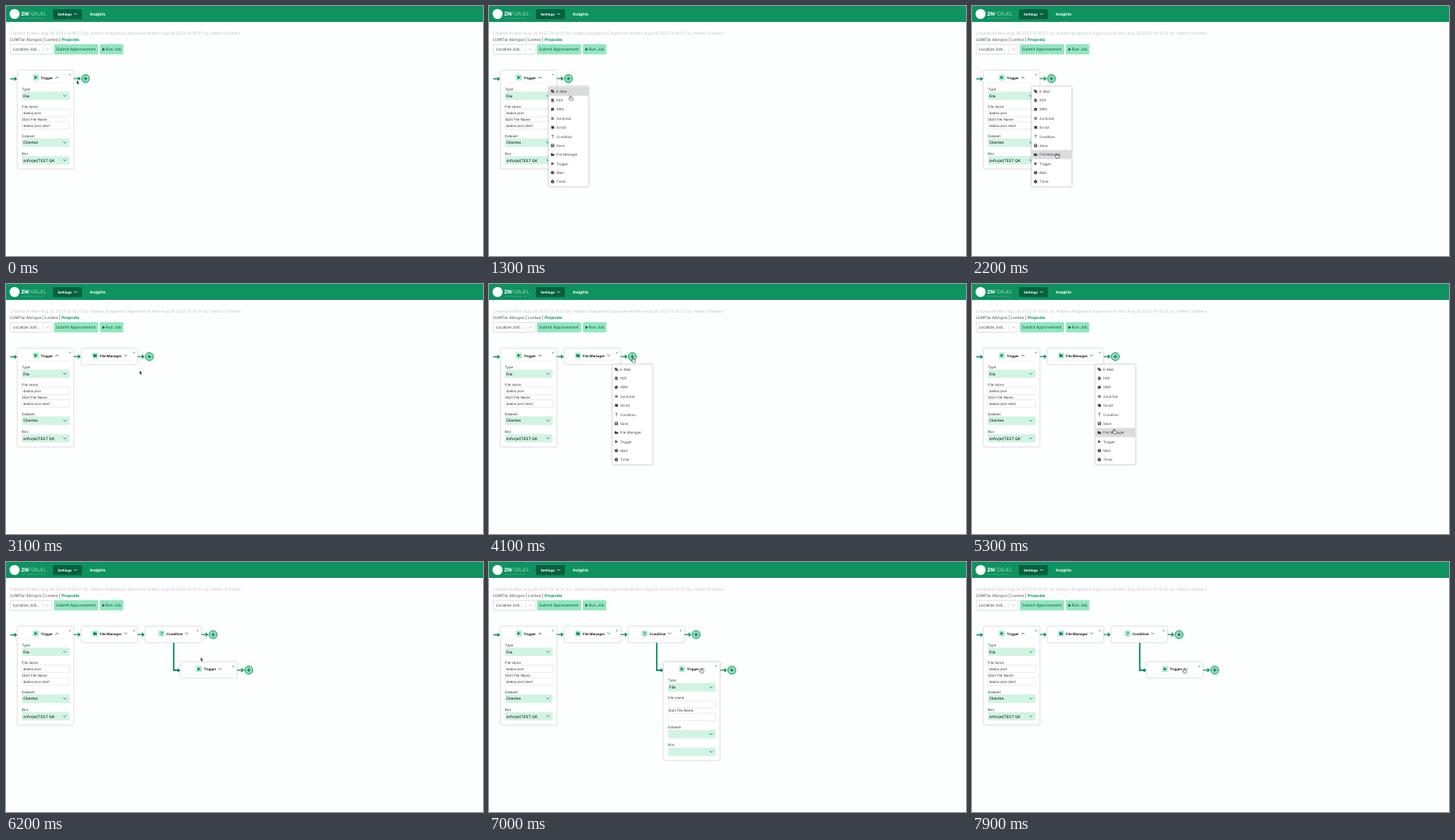
An HTML page that plays this animation: 600 px wide and 314 px high, repeating every 8000 ms.

```html
<!DOCTYPE html>
<html lang="en">
<head>
<meta charset="utf-8">
<title>Flow builder</title>
<style>
html, body { margin: 0; width: 100%; height: 100%; overflow: hidden; background: #fdfefe; }
svg { display: block; width: 600px; height: 314px; }
text { font-family: Inter, sans-serif; font-size: 4.4px; fill: #333; text-rendering: geometricPrecision; white-space: pre; }
.m { font-size: 5.04px; }
.s { font-size: 4.8px; font-weight: 500; fill: #222; }
.b { font-weight: 700; }
.card { fill: #fff; stroke: #dcdfde; stroke-width: .6; filter: drop-shadow(0 .6px .8px #0002); }
.field { fill: #fff; stroke: #d6d6d6; stroke-width: .5; }
.select { fill: #d2f4e3; }
.line { fill: none; stroke: #0d8f60; stroke-width: 1.3; }
.chev { fill: none; stroke-width: .8; stroke-linecap: round; stroke-linejoin: round; }

.anim, #cursor, .hover { animation: 8s step-end infinite; }
#add1 { animation-name: add1; }
#file { animation-name: file; }
#add2 { animation-name: add2; }
#cond { animation-name: cond; }
#menu1 { animation-name: menu1; }
#menu2 { animation-name: menu2; }
#open { animation-name: open; }
#arrow { animation-name: arrow; }
#hand { animation-name: hand; }
#menu1 .hover { animation-name: hover1; }
#menu2 .hover { animation-name: hover2; }
#cursor { animation-name: move; animation-timing-function: linear; }

@keyframes add1 { 0% { opacity: 1 } 29.375%, 100% { opacity: 0 } }
@keyframes file { 0% { opacity: 0 } 29.375%, 100% { opacity: 1 } }
@keyframes add2 { 0% { opacity: 0 } 29.375% { opacity: 1 } 71%, 100% { opacity: 0 } }
@keyframes cond { 0% { opacity: 0 } 71%, 100% { opacity: 1 } }
@keyframes menu1 { 0% { opacity: 0 } 10.625% { opacity: 1 } 29.375%, 100% { opacity: 0 } }
@keyframes menu2 { 0% { opacity: 0 } 47.5% { opacity: 1 } 71%, 100% { opacity: 0 } }
@keyframes open { 0% { opacity: 0 } 84.375% { opacity: 1 } 98.125%, 100% { opacity: 0 } }
@keyframes arrow {
  0% { opacity: 1 } 2.5% { opacity: 0 } 29.375% { opacity: 1 } 40% { opacity: 0 }
  71% { opacity: 1 } 81.5%, 100% { opacity: 0 }
}
@keyframes hand {
  0% { opacity: 0 } 2.5% { opacity: 1 } 29.375% { opacity: 0 } 40% { opacity: 1 }
  71% { opacity: 0 } 81.5%, 100% { opacity: 1 }
}
@keyframes move {
  0%, 1% { transform: translate(89px, 93.2px) }
  5%, 12.5% { transform: translate(100px, 91.5px) }
  15%, 16.25% { transform: translate(102.6px, 112.3px) }
  26.25%, 30.5% { transform: translate(106.5px, 185px) }
  40.5%, 53.75% { transform: translate(181px, 92.5px) }
  61.25%, 62.5% { transform: translate(180px, 208px) }
  65%, 66.9% { transform: translate(178.6px, 182px) }
  69.4%, 71.5% { transform: translate(179px, 163.5px) }
  77%, 78% { transform: translate(244.8px, 119.6px) }
  82.5%, 100% { transform: translate(266.9px, 133.3px) }
}
@keyframes hover1 {
  0% { opacity: 0; transform: translateY(0) }
  14% { opacity: 1; transform: translateY(0) }
  16.32% { opacity: 1; transform: translateY(11.35px); animation-timing-function: steps(6) }
  25.7%, 100% { opacity: 1; transform: translateY(79.45px) }
}
@keyframes hover2 {
  0% { opacity: 0; transform: translateY(0) }
  54.3% { opacity: 1; transform: translateY(0); animation-timing-function: steps(9) }
  60.96% { opacity: 1; transform: translateY(102.15px) }
  62.91% { opacity: 1; transform: translateY(90.8px) }
  64.01% { opacity: 1; transform: translateY(79.45px) }
  67.01% { opacity: 1; transform: translateY(68.1px) }
  68.55%, 100% { opacity: 1; transform: translateY(56.75px) }
}
</style>
</head>
<body>
<svg id="stage" viewBox="0 0 600 314"></svg>
<script>
const text = (x, y, s, cls = '', fill = '') =>
  `<text x="${x}" y="${y}" class="${cls}"${fill && ` style="fill:${fill}"`}>${s}</text>`;
const rect = (x, y, w, h, attrs) => `<rect x="${x}" y="${y}" width="${w}" height="${h}" ${attrs}/>`;
const at = (x, y, body) => `<g transform="translate(${x} ${y})">${body}</g>`;
const anim = (id, body) => `<g id="${id}" class="anim">${body}</g>`;
const chevron = (x, y, up, color = '#17694a') =>
  `<path class="chev" stroke="${color}" d="M${x - 1.6} ${y + (up ? .8 : -.8)}l1.6 ${up ? -1.6 : 1.6}l1.6 ${up ? 1.6 : -1.6}"/>`;

// Icons are about 4px wide, centred on 0,0
const clock = '<circle r="2.1"/><path d="M0-1.2V.2L.8.8" fill="none" stroke="#fff" stroke-width=".5"/>';
const icons = {
  mail: '<path d="M-2-1.8h2.6v1.2h1.5v2.5h-3.2v-1.2h-.9z"/><path d="M-1.1-.3l1.6 1.1 1.6-1.1" fill="none" stroke="#fff" stroke-width=".4"/>',
  page: '<path d="M-1.6-2.1h2l1.2 1.2v3h-3.2z"/><path d="M-.8.2h1.6M-.8 1.1h1.6" stroke="#fff" stroke-width=".4"/>',
  bubble: '<path d="M-2.1-.2a2.1 1.8 0 1 1 2.1 1.8l-1.8.5.4-1a1.8 1.6 0 0 1-.7-1.3z"/><path d="M-1.1-.2h2.2" stroke="#fff" stroke-width=".5" stroke-dasharray=".5 .35"/>',
  dot: '<circle r="1.9" fill="#888"/>',
  scroll: '<path d="M-1.9-1.8h3q.8 0 .8 1v2.6h-2.7q-.8 0-.8-.9v-1.7h-.3z"/>',
  ask: '<path d="M-1-1Q-.9-1.9 0-1.9 1.1-1.9 1.1-1 1.1-.4 0 .1V.7" fill="none" stroke="currentColor" stroke-width=".8"/><circle cy="1.8" r=".5"/>',
  save: '<path d="M-1.9-1.9h3l.8.8v3h-3.8z"/><path d="M-1.2-1.3h2v.9h-2z" fill="#fff"/><circle cy=".8" r=".6" fill="#fff"/>',
  folder: '<path d="M-2.1-1.6h1.6l.6.6h2v2.6h-4.2z"/>',
  play: '<path d="M-1.5-2L2 0-1.5 2z"/>',
  clock,
  timer: clock + '<path d="M-.6-2.4h1.2" stroke="currentColor" stroke-width=".5"/>'
};
const icon = (name, x, y, color) => `<g transform="translate(${x} ${y})" fill="${color}" color="${color}">${icons[name]}</g>`;

const arrow = (x, y) => `<path class="line" d="M${x} ${y}h7.6m-2.4-2.1l2.4 2.1l-2.4 2.1"/>`;
const add = (x, y) => arrow(x - 14.6, y) +
  `<circle cx="${x}" cy="${y}" r="5" fill="#8fe4bd" stroke="#0d8f60"/>` +
  `<path d="M${x - 2.5} ${y}h5m-2.5-2.5v5" stroke="#0b5c3e" stroke-width=".9"/>`;

const select = (y, value) => rect(5.5, y, 60, 10.6, 'rx=".8" class="select"') +
  text(7, y + 7, value, 's') + chevron(59.5, y + 5.3);
const input = (y, value) => rect(5.5, y, 60, 9.4, 'rx=".6" class="field"') + text(7, y + 6.4, value);
const label = (y, s) => text(5.5, y, s);

function form(file, start, data, box) {
  return label(24.7, 'Type') + select(26.5, 'File') +
    label(46.7, 'File name') + input(48.4, file) +
    label(62.6, 'Start File Name') + input(64.3, start) +
    label(83.5, 'Dataset') + select(85.3, data) +
    label(105.7, 'Box') + select(107.5, box);
}

function node(x, y, title, name, cx, body = '') {
  return at(x, y,
    rect(0, 0, 70.5, body ? 123.5 : 20, 'rx="1" class="card"') +
    '<path d="M5.5 15.5h60" stroke="#e6e8e7" stroke-width=".5"/>' +
    '<path d="M64.9 4.3l2 2m0-2l-2 2" stroke="#0d8f60" stroke-width=".6"/>' +
    rect(cx - 3.6, 5.2, 7.2, 7.2, 'rx=".8" fill="#a5ebca"') +
    icon(name, cx, 8.8, '#0b7a52') + text(cx + 6, 10.5, title, 'b', '#222') +
    chevron(72.5 - cx, 8.8, !!body) + body);
}

const items = [['E-Mail', 'mail'], ['PDF', 'page'], ['SMS', 'bubble'], ['Zuntchat', 'dot'],
  ['Script', 'scroll'], ['Condition', 'ask'], ['Save', 'save'], ['File Manager', 'folder'],
  ['Trigger', 'play'], ['Wait', 'clock'], ['Timer', 'timer']];
const row = 11.35;
const menu = (id, x) => anim(id, at(x, 101.2,
  rect(0, 0, 50.3, 125.6, 'rx="1" class="card" style="filter:drop-shadow(0 .8px 1.2px #0004)"') +
  rect(.2, .3, 49.9, row, 'class="hover" fill="#dadbdd"') +
  items.map(([s, name], i) => {
    const y = .3 + row * (i + .5);
    return icon(name, 5, y, '#3d3d3d') + text(9.8, y + 1.6, s, '', '#444');
  }).join('')));

const header = rect(0, 0, 600, 20, 'fill="#0d9260"') +
  '<circle cx="10.8" cy="10" r="6.3" fill="#fff"/>' +
  '<text x="19" y="12.2" style="font-size:6.2px;fill:#fff"><tspan font-weight="800">ZN</tspan><tspan font-weight="300" fill="#c5ead9">FORJEL</tspan></text>' +
  text(19, 15.8, 'smart customer journey flows', '" font-size="2" style="font-size:2px;fill:#6fc09f') +
  rect(59, 4, 36.5, 12.4, 'rx="1.2" fill="#07603f"') +
  text(65, 11.9, 'Settings', 'b', '#fff') + chevron(87.5, 10.2, false, '#fff') +
  text(105.4, 12, 'Insights', 'm b', '#fff');

const toolbar =
  text(5, 36, "Created At Mon Aug 28 2023 13:18:37, by: Adílson Bragantes| Approved At Mon Aug 28 2023 14:16:37, by: Nelmir Q'Astero", 'm', '#c6c6c6') +
  '<text x="5" y="43.8" class="m b" style="fill:#8a8a8a">LUMTar Abrigos | Lentes | <tspan fill="#0d8f60">Proposta</tspan></text>' +
  rect(5.2, 48.3, 52.6, 12.2, 'rx="1" fill="#fff" stroke="#ccc" stroke-width=".6"') +
  text(8.4, 56.2, 'Localize Job...', 'm', '#444') +
  '<path d="M46.4 50.5v8" stroke="#ccc" stroke-width=".5"/>' + chevron(52.2, 54.5, false, '#aaa') +
  rect(60.3, 48, 55.6, 12.8, 'rx="1.2" fill="#92e6c0"') + text(62.8, 56.2, 'Submit Approvement', 'm', '#0b5e40') +
  rect(118.2, 48, 29.4, 12.8, 'rx="1.2" fill="#92e6c0"') + icon('play', 122.8, 54.4, '#0b5e40') +
  text(125.6, 56.2, 'Run Job', 'm', '#0b5e40');

const cursor = '<g id="cursor">' +
  anim('arrow', '<path d="M0 0v5l1.1-1 .8 1.8.9-.4-.8-1.7h1.5z" fill="#111" stroke="#fff" stroke-width=".4"/>') +
  anim('hand', '<path d="M-.7.6Q0-.4.6.6V2.3l2 .5q.7.2.6 1L2.7 6.1H-.5L-2.1 3.6q0-.8.8-.5l.6.6z" fill="#fff" stroke="#222" stroke-width=".6" stroke-linejoin="round"/>') +
  '</g>';

document.getElementById('stage').innerHTML =
  rect(0, 0, 600, 314, 'fill="#fdfefe"') + header + toolbar +
  arrow(5.4, 91.5) +
  node(14.5, 81, 'Trigger', 'play', 23, form('dados.json', 'dados.json.start', 'Clientes', 'znforjel/TEST QK')) +
  anim('add1', add(100, 91.2)) +
  anim('file', arrow(85.4, 91.2) + node(95, 81, 'File Manager', 'folder', 17)) +
  anim('add2', add(180.3, 91.2)) +
  anim('cond', arrow(165.7, 91.2) + node(175.2, 81, 'Condition', 'ask', 20.5) + add(260.5, 91.2) +
    '<path class="line" style="stroke-width:1.8" d="M211 101.5V136h7"/><path class="line" d="M216 133.9l2.3 2.1l-2.3 2.1"/>' +
    node(219.8, 125.6, 'Trigger', 'play', 23) + add(305.4, 135.8)) +
  anim('open', node(219.8, 125.6, 'Trigger', 'play', 23, form('', '', '', ''))) +
  menu('menu1', 75) + menu('menu2', 155.2) + cursor;
</script>
</body>
</html>
```
